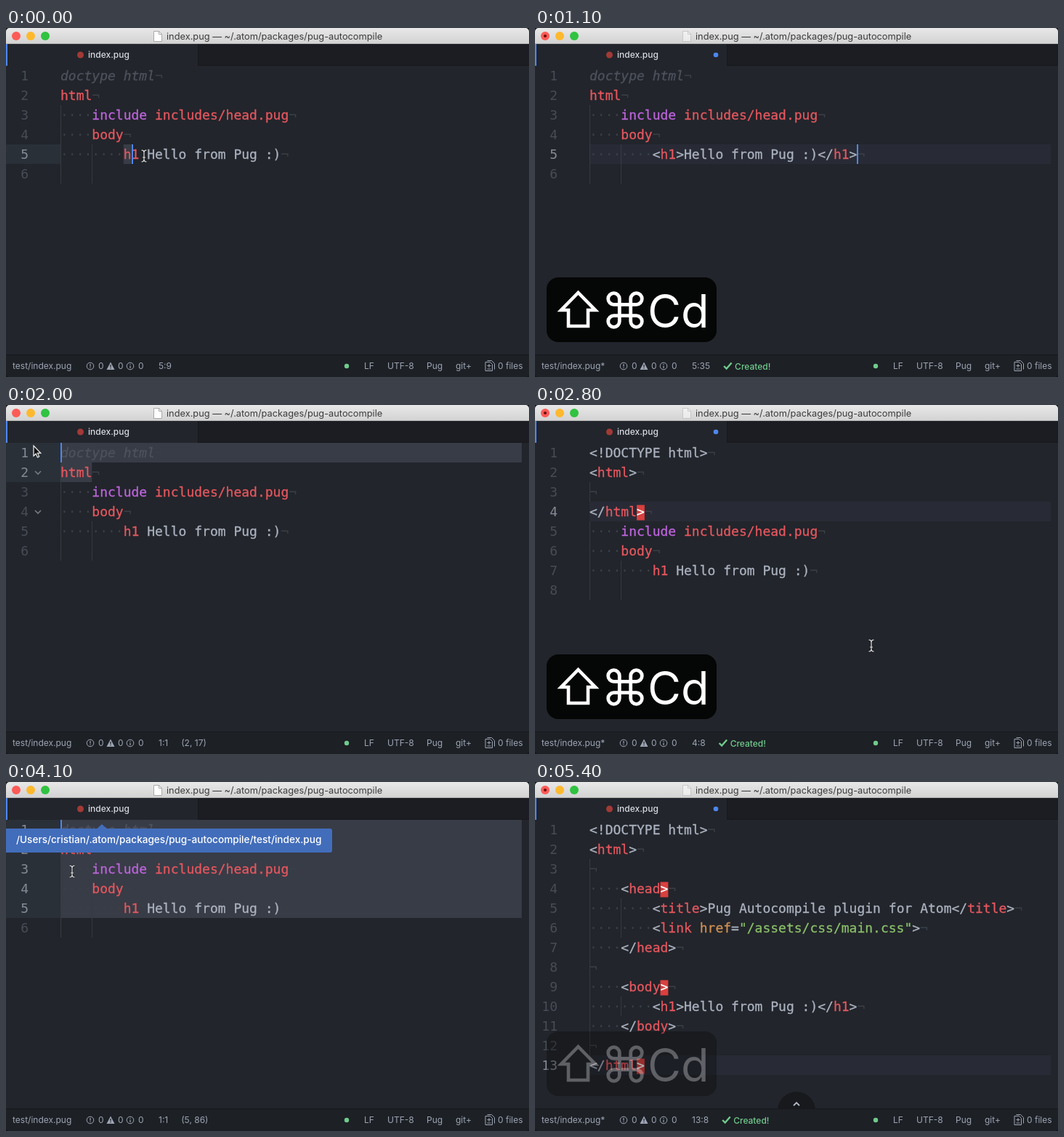
Write an HTML page with a canvas that moves like this. It is 720 by 480 pixels and loops after 5500 ms.

```html
<!DOCTYPE html>
<html lang="en">
<head>
<meta charset="utf-8">
<title>Pug autocompile</title>
<style>
html, body { margin: 0; width: 100%; height: 100%; overflow: hidden; background: #15161c; }
canvas { display: block; width: 720px; height: 480px; }
</style>
</head>
<body>
<canvas id="stage" width="720" height="480"></canvas>
<script>
const ctx = document.getElementById('stage').getContext('2d');
const LOOP = 5500, STEP = 100;
const LEFT = 75, TOP = 52, ROW = 27, CHAR = 10.836, RIGHT = 710;
const UI = 'Inter, sans-serif';
const MONO = '"DejaVu Sans Mono", monospace';
const BG = '#22252b', BLUE = '#4f86ec', STATUS = '#9da5b4', GREEN = '#70cb8c';
const INK = { t: '#abb2bf', r: '#e5575f', p: '#bd64dc', o: '#cf8f52', g: '#8bbf69', c: '#4d525d', x: '#ffffff' };

// "~k" switches the ink; a number is a blank line with that many indent guides.
const H1 = '        ~t<~rh1~t>Hello from Pug :)</~rh1~t>';
const INCLUDE = '    ~pinclude ~rincludes/head.pug';
const HTML_OPEN = ['~t<!DOCTYPE html>', '~t<~rhtml~t>', 1];
const PUG = ['~cdoctype html', '~rhtml', INCLUDE, '    ~rbody', '        ~rh1~t Hello from Pug :)', 2];
const INLINE = [...PUG.slice(0, 4), H1, 2];
const BLOCK = [...HTML_OPEN, '~t</~rhtml~x>', ...PUG.slice(2)];
const fullPage = mark => [
  ...HTML_OPEN,
  `    ~t<~rhead~${mark}>`,
  '        ~t<~rtitle~t>Pug Autocompile plugin for Atom</~rtitle~t>',
  '        ~t<~rlink ~ohref~t=~g"/assets/css/main.css"~t>',
  '    ~t</~rhead~t>',
  1,
  `    ~t<~rbody~${mark}>`,
  H1,
  '    ~t</~rbody~t>',
  1,
  '~t</~rhtml~x>'
];

const POINTER = [
  [[0, 190, 176], [4, 385, 177], [5, 385, 177]],
  [[18, 60, 150], [19, 38, 90], [20, 38, 56], [21, 38, 56], [24, 450, 322], [25, 463, 331], [32, 463, 331],
   [35, 461, 328], [38, 38, 170], [39, 38, 112], [40, 70, 44], [41, 91, 123], [43, 455, 320], [47, 455, 320]]
];

const between = (s, a, b) => s >= a && s <= b;

function rect(x, y, w, h, fill) {
  ctx.fillStyle = fill;
  ctx.fillRect(x, y, w, h);
}

function round(x, y, w, h, r, fill) {
  ctx.beginPath();
  ctx.roundRect(x, y, w, h, r);
  ctx.fillStyle = fill;
  ctx.fill();
}

function disc(x, y, r, fill) {
  ctx.beginPath();
  ctx.arc(x, y, r, 0, 7);
  ctx.fillStyle = fill;
  ctx.fill();
}

function poly(points, { stroke, fill, width = 1, close = false }) {
  ctx.beginPath();
  points.forEach(([x, y]) => ctx.lineTo(x, y));
  if (close) ctx.closePath();
  if (fill) { ctx.fillStyle = fill; ctx.fill(); }
  if (stroke) { ctx.strokeStyle = stroke; ctx.lineWidth = width; ctx.stroke(); }
}

function text(str, x, y, font, fill) {
  ctx.font = font;
  ctx.fillStyle = fill;
  ctx.fillText(str, x, y);
  return ctx.measureText(str).width;
}

function code(str, x, y, fill, style = '') {
  text(str, x, y, `${style} 18px ${MONO}`, fill);
  ctx.strokeStyle = fill;
  ctx.lineWidth = 0.3;
  ctx.strokeText(str, x, y);
}

const colX = col => LEFT + col * CHAR;
const rowY = row => TOP + (row - 1) * ROW;

function documentAt(s) {
  if (between(s, 8, 14)) return INLINE;
  if (between(s, 27, 32)) return BLOCK;
  if (s >= 47) return fullPage(s >= 51 ? 'x' : 't');
  return PUG;
}

// Selection, caret and status-bar position for a step.
function editAt(s) {
  if (between(s, 8, 14)) return { caret: [5, 34], pos: '5:35' };
  if (between(s, 27, 32)) return { line: 4, pos: '4:8' };
  if (s >= 47) return { line: 13, pos: '13:8' };
  if (s < 19) {
    const n = [1, 5, 10, 15, 19][s] || 20;
    return {
      from: [5, 8], to: [5, 8 + n], caret: [5, 8 + n],
      pos: s ? `5:${9 + n}` : '5:9', size: s ? `(1, ${n})` : ''
    };
  }
  if (s === 19) return { from: [2, 0], to: [2, 4], caret: [2, 0], pos: '2:1', size: '(1, 4)' };
  if (s < 38) return { from: [1, 0], to: [2, 4], caret: [1, 0], pos: '1:1', size: '(2, 17)' };
  const first = s === 38 ? 5 : s === 39 ? 3 : 1;
  const size = { 5: '(1, 29)', 3: '(3, 68)', 1: '(5, 86)' }[first];
  return { from: [first, 0], to: [5, 99], caret: [first, 0], pos: `${first}:1`, size };
}

function pointerAt(s) {
  for (const path of POINTER) {
    for (let i = 1; i < path.length; i++) {
      const [a, ax, ay] = path[i - 1], [b, bx, by] = path[i];
      if (between(s, a, b)) {
        const k = (s - a) / (b - a);
        return { x: ax + (bx - ax) * k, y: ay + (by - ay) * k };
      }
    }
  }
  return null;
}

function keysAt(s) {
  if (between(s, 6, 7) || between(s, 25, 26) || between(s, 45, 46)) return { keys: 'SMC', alpha: 1 };
  if (between(s, 8, 14) || between(s, 27, 32) || between(s, 47, 54))
    return { keys: 'SMCd', alpha: s === 53 ? 0.65 : s === 54 ? 0.3 : 1 };
  if (between(s, 15, 19)) return { keys: 'MZ', alpha: s === 18 ? 0.65 : s === 19 ? 0.3 : 1 };
  if (between(s, 33, 38)) return { keys: 'MZ', alpha: s === 37 ? 0.65 : s === 38 ? 0.3 : 1 };
  return null;
}

function drawTitle(modified) {
  const shade = ctx.createLinearGradient(0, 0, 0, 22);
  shade.addColorStop(0, '#e8e8e8');
  shade.addColorStop(1, '#d2d2d2');
  rect(0, 0, 720, 22, shade);
  rect(0, 21, 720, 1, '#b3b3b3');
  ['#fc5b57', '#fdb92e', '#30c341'].forEach((c, i) => disc(14 + i * 20, 11, 6, c));
  if (modified) disc(14, 11, 2.1, '#6d0d0b');
  ctx.globalAlpha = modified ? 0.5 : 1;
  poly([[203.5, 4.5], [210.5, 4.5], [214.5, 8.5], [214.5, 18.5], [203.5, 18.5]],
    { fill: '#fff', stroke: '#a9a9a9', close: true });
  poly([[210.5, 4.5], [210.5, 8.5], [214.5, 8.5]], { stroke: '#a9a9a9' });
  ctx.globalAlpha = 1;
  text('index.pug — ~/.atom/packages/pug-autocompile', 221, 16, `12.8px ${UI}`, '#3c3c3c');
}

function drawTabs(modified) {
  rect(0, 22, 720, 30, '#1b1d22');
  rect(264, 51, 456, 1, '#16181c');
  rect(0, 22, 264, 30, BG);
  rect(264, 22, 1, 30, '#16181c');
  rect(0, 22, 2, 30, BLUE);
  disc(102.5, 37, 4.5, '#a23a36');
  text('index.pug', 113, 41, `500 12px ${UI}`, '#d7dae0');
  if (modified) disc(249, 37, 3.3, BLUE);
}

function drawLine(line, row, last) {
  const y = rowY(row), base = y + 20;
  const blank = typeof line === 'number';
  const indent = blank ? 0 : line.search(/\S/);
  const guides = blank ? line : indent / 4;
  for (let i = 0; i < guides; i++) rect(Math.floor(colX(i * 4)), y, 1, ROW, '#363a41');
  let col = indent;
  if (indent) text('·'.repeat(indent), LEFT, base, `18px ${MONO}`, '#3b4047');
  if (!blank) {
    for (const part of line.trim().split('~').slice(1)) {
      const ink = part[0], str = part.slice(1);
      if (ink === 'x') rect(colX(col), y + 4.5, CHAR, 21, '#d9403f');
      code(str, colX(col), base, INK[ink], ink === 'c' ? 'italic' : '');
      col += str.length;
    }
  }
  if (!last) text('¬', colX(col), base, `18px ${MONO}`, '#3a3f46');
}

function drawEditor(lines, edit, pointer) {
  const { from, to, caret } = edit;
  const current = edit.line || caret[0];
  if (from) {
    for (let r = from[0]; r <= to[0]; r++) {
      const x1 = r === from[0] ? colX(from[1]) : LEFT;
      const x2 = r === to[0] ? Math.min(colX(to[1]), RIGHT) : RIGHT;
      rect(0, rowY(r), LEFT, ROW, '#2a3038');
      rect(x1, rowY(r), x2 - x1, ROW, '#383c46');
    }
  } else {
    rect(LEFT, rowY(current), RIGHT - LEFT, ROW, '#282b35');
  }
  lines.forEach((line, i) => {
    const row = i + 1;
    const active = from ? between(row, from[0], to[0]) : row === current;
    ctx.textAlign = 'right';
    text(row, 31, rowY(row) + 20, `18px ${MONO}`, active ? '#858b96' : '#474c56');
    ctx.textAlign = 'left';
    drawLine(line, row, row === lines.length);
  });
  if (caret) rect(Math.round(colX(caret[1])), rowY(caret[0]), 2, ROW, BLUE);
  if (pointer && pointer.x < 60 && pointer.y > TOP) {
    for (const y of [93, 147]) poly([[40, y - 2], [44, y + 2], [48, y - 2]], { stroke: '#737984', width: 1.7 });
  }
}

function ring(x, y) {
  ctx.beginPath();
  ctx.arc(x, y, 4.8, 0, 7);
  ctx.strokeStyle = STATUS;
  ctx.lineWidth = 1;
  ctx.stroke();
}

function drawStatus(edit, modified, created) {
  const font = `12px ${UI}`;
  const put = (str, x) => text(str, x, 469, font, STATUS);
  rect(0, 449, 720, 31, '#1d2025');
  rect(0, 449, 720, 1, '#16181c');
  put('test/index.pug' + (modified ? '*' : ''), 9);
  const dx = modified ? 6 : 0;
  ring(116 + dx, 465);
  rect(115.4 + dx, 462, 1.2, 3.6, STATUS);
  rect(115.4 + dx, 466.6, 1.2, 1.2, STATUS);
  put('0', 127 + dx);
  poly([[144 + dx, 459.5], [149.5 + dx, 470], [138.5 + dx, 470]], { fill: STATUS, close: true });
  rect(143.4 + dx, 463, 1.2, 3.4, '#1d2025');
  rect(143.4 + dx, 467.3, 1.2, 1.2, '#1d2025');
  put('0', 154 + dx);
  ring(171 + dx, 465);
  rect(170.4 + dx, 464.5, 1.2, 3.5, STATUS);
  rect(170.4 + dx, 462, 1.2, 1.2, STATUS);
  put('0', 182 + dx);

  let x = 210 + dx;
  x += put(edit.pos, x) + 18;
  if (edit.size) x += put(edit.size, x) + 18;
  if (created) {
    poly([[x + 1, 465], [x + 4.5, 468.5], [x + 11.5, 460.5]], { stroke: GREEN, width: 2.4 });
    text('Created!', x + 16, 470, `500 12px ${UI}`, GREEN);
  }

  disc(469, 465, 3.2, GREEN);
  [['LF', 493], ['UTF-8', 525], ['Pug', 579], ['git+', 619], ['0 files', 677]].forEach(([s, at]) => put(s, at));
  poly([[662.5, 457.5], [668.5, 457.5], [672.5, 461.5], [672.5, 469.5]], { stroke: STATUS });
  poly([[660, 459.5], [666.5, 459.5], [669.5, 462.5], [669.5, 471.5], [660, 471.5]], { stroke: STATUS, close: true });
  rect(662.5, 464, 5, 1, STATUS);
  rect(664.5, 462, 1, 5, STATUS);
  rect(662.5, 468.5, 5, 1, STATUS);
}

function drawShift(x) {
  const shape = [[27.5, 364], [51, 388], [41, 388], [41, 410], [14, 410], [14, 388], [4, 388]];
  poly(shape.map(([px, py]) => [x + px, py]), { stroke: '#fff', width: 4.6, close: true });
}

function drawCommand(x) {
  const c = 15.5, r = 7.8;
  ctx.save();
  ctx.translate(x + 26, 388);
  ctx.beginPath();
  for (let i = 0; i < 4; i++) {
    ctx.lineTo(c - r, c);
    ctx.lineTo(c - r, -c);
    ctx.arc(c, -c, r, Math.PI, Math.PI / 2);
    ctx.rotate(-Math.PI / 2);
  }
  ctx.closePath();
  ctx.strokeStyle = '#fff';
  ctx.lineWidth = 4.8;
  ctx.stroke();
  ctx.restore();
}

function drawKeys({ keys, alpha }) {
  const width = { SMC: 197, SMCd: 234, MZ: 127 }[keys];
  ctx.globalAlpha = alpha;
  round(16, 343, width, 89, 16, '#050606');
  let x = 33;
  if (keys[0] === 'S') { drawShift(x - 1); x += 65; }
  drawCommand(x);
  text(keys.slice(keys.indexOf('M') + 1), x + 57, 412, `63px ${UI}`, '#fff');
  ctx.globalAlpha = 1;
}

function drawPointer({ x, y }) {
  ctx.save();
  ctx.translate(Math.round(x), Math.round(y));
  if (x < 60 || y < TOP) {
    const tip = [[0, 0], [0, 14], [3.2, 11], [5.4, 16], [7.6, 15], [5.5, 10.2], [9.8, 10.2]];
    poly(tip, { fill: '#111', stroke: '#f2f2f2', width: 1.2, close: true });
  } else {
    for (const [stroke, width] of [['#15171b', 2.6], ['#e8e8e8', 1.2]]) {
      poly([[0, -6], [0, 6]], { stroke, width });
      for (const d of [-1, 1]) poly([[-3.5, 8 * d], [-1.5, 7.6 * d], [0, 6 * d], [1.5, 7.6 * d], [3.5, 8 * d]], { stroke, width });
      poly([[-2, 2], [2, 2]], { stroke, width });
    }
  }
  ctx.restore();
}

function drawTooltip() {
  const blue = '#426dbb';
  poly([[125, 64.5], [132, 58], [139, 64.5]], { fill: blue });
  round(-3, 64, 452, 33, 3, blue);
  text('/Users/cristian/.atom/packages/pug-autocompile/test/index.pug', 14, 84, `500 13.6px ${UI}`, '#fff');
}

function drawDock() {
  disc(360, 452, 26, '#17191d');
  poly([[356, 445], [360, 441], [364, 445]], { stroke: '#b4bac5', width: 1.8 });
}

function draw(s) {
  const lines = documentAt(s), edit = editAt(s), pointer = pointerAt(s), keys = keysAt(s);
  const modified = lines !== PUG;
  const created = between(s, 8, 18) || between(s, 27, 37) || s >= 47;
  rect(0, 0, 720, 480, '#15161c');
  ctx.save();
  ctx.beginPath();
  ctx.roundRect(0, 0, 720, 480, 5);
  ctx.clip();
  rect(0, 0, 720, 480, BG);
  drawTitle(modified);
  drawTabs(modified);
  drawEditor(lines, edit, pointer);
  if (s >= 51) drawDock();
  drawStatus(edit, modified, created);
  if (between(s, 40, 41)) drawTooltip();
  if (keys) drawKeys(keys);
  if (pointer) drawPointer(pointer);
  ctx.restore();
}

function tick() {
  draw(Math.floor(performance.now() % LOOP / STEP));
  requestAnimationFrame(tick);
}
tick();
</script>
</body>
</html>
```
